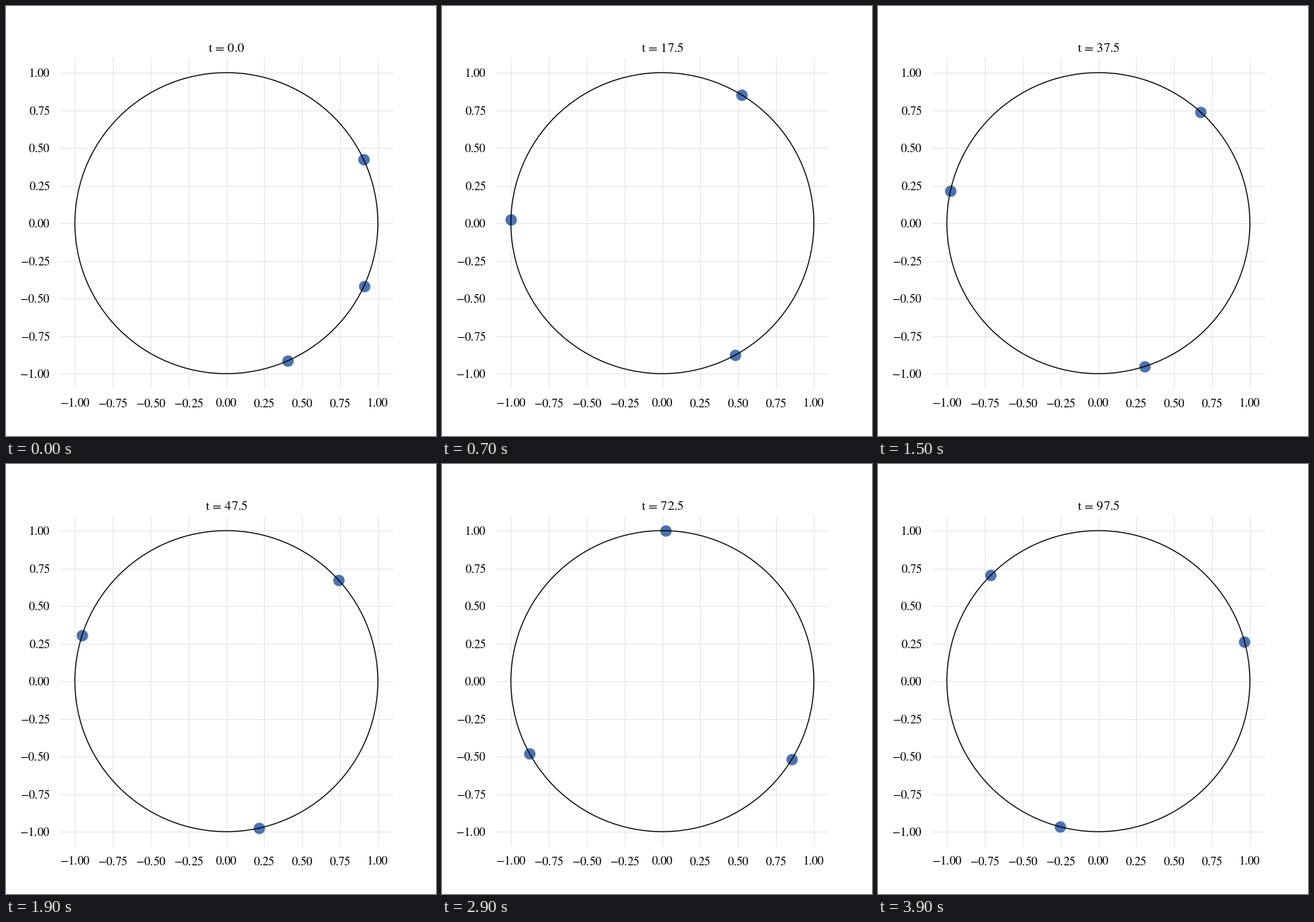
These frames come from a looping animation (600 by 600 pixels, 4 s). A matplotlib script:

```python
import numpy as np
import matplotlib.pyplot as plt
from matplotlib.animation import FuncAnimation

FRAMES = 40
INTERVAL = 100
STEP = 2.5        # model time per frame
OMEGA = 0.2       # shared natural frequency
COUPLING = -2.0   # negative: the oscillators repel
SUBSTEPS = 50

plt.rcParams.update({
    "font.family": "Liberation Serif",
    "mathtext.fontset": "stix",
})


def roman(text):
    return rf"$\mathrm{{{text}}}$"


def title_text(t):
    gap = r"\hspace{0.146}"
    return roman(f"t{gap}={gap}{t:.1f}")


def velocity(theta):
    pull = np.sin(theta[None, :] - theta[:, None]).mean(axis=1)
    return OMEGA + COUPLING * pull


def rk4(theta, h):
    k1 = velocity(theta)
    k2 = velocity(theta + h / 2 * k1)
    k3 = velocity(theta + h / 2 * k2)
    k4 = velocity(theta + h * k3)
    return theta + h / 6 * (k1 + 2 * k2 + 2 * k3 + k4)


def simulate(theta):
    path = [theta]
    for _ in range(FRAMES - 1):
        for _ in range(SUBSTEPS):
            theta = rk4(theta, STEP / SUBSTEPS)
        path.append(theta)
    return np.array(path)


phases = simulate(np.radians([25.0, -24.7, -66.2]))

fig = plt.figure(figsize=(6, 6), dpi=100, facecolor="white")
ax = fig.add_axes([0.125, 0.11, 0.775, 0.77])
ax.set(xlim=(-1.1, 1.1), ylim=(-1.1, 1.1))
ax.set_axisbelow(True)
ax.grid(color="#e5e5e5", linewidth=0.72)
for spine in ax.spines.values():
    spine.set_visible(False)

ticks = np.linspace(-1, 1, 9)
labels = [roman(f"{v:.2f}") for v in ticks]
ax.set_xticks(ticks, labels)
ax.set_yticks(ticks, labels)
ax.tick_params(length=0, pad=9.5, labelsize=12.1)

dots = ax.scatter(np.cos(phases[0]), np.sin(phases[0]),
                  s=100, color="#4c72b0", linewidths=1.5)
ax.add_patch(plt.Circle((0, 0), 1, fill=False, edgecolor="black", linewidth=1))
title = ax.set_title(title_text(0), fontsize=13.2, pad=6)


def update(i):
    dots.set_offsets(np.column_stack([np.cos(phases[i]), np.sin(phases[i])]))
    title.set_text(title_text(i * STEP))
    return dots, title


anim = FuncAnimation(fig, update, frames=FRAMES, interval=INTERVAL, repeat=True)
plt.show()
```
